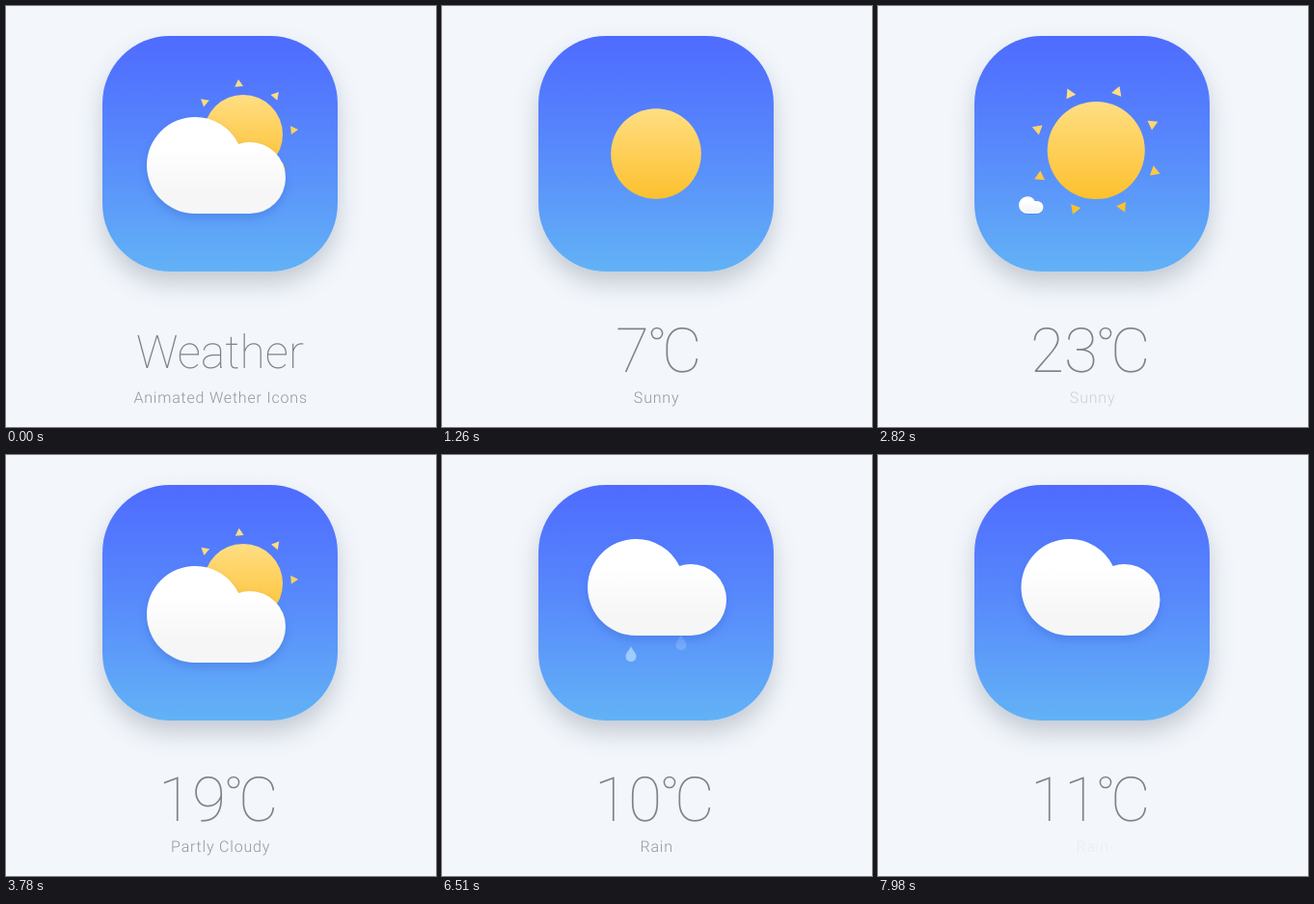
Recreate the animation shown at these times as an HTML page. Size 446x436 px, loop 8000 ms.

```html
<!DOCTYPE html>
<html lang="en">
<head>
<meta charset="utf-8">
<title>Weather icons</title>
<style>
  html, body { margin: 0; width: 100%; height: 100%; overflow: hidden; background: #f3f7fc; }
  .icon {
    position: absolute; left: 99.5px; top: 30.5px; width: 244px; height: 244px;
    border-radius: 70px;
    background: linear-gradient(#4e6bff, #5787fc 45%, #62b2f6);
    box-shadow: 0 13px 24px rgba(60, 70, 90, .25);
  }
  svg { position: absolute; left: 0; top: 0; display: block; }
  text { font-family: Roboto, "Open Sans", sans-serif; text-rendering: geometricPrecision; }
  .title { font-size: 48px; font-weight: 100; fill: #7f8288; }
  .temp { font-size: 64px; font-weight: 100; fill: #7f8288; }
  .label { font-size: 16px; font-weight: 300; letter-spacing: .8px; fill: #93969b; }
  #cloud { filter: drop-shadow(0 5px 4px rgba(30, 70, 190, .22)); }
</style>
</head>
<body>
<div class="icon"></div>
<svg width="446" height="436" viewBox="0 0 446 436">
  <defs>
    <linearGradient id="gold" gradientUnits="userSpaceOnUse" x1="0" y1="-53" x2="0" y2="53">
      <stop offset="0" stop-color="#ffde83"/>
      <stop offset="1" stop-color="#fdc02d"/>
    </linearGradient>
    <linearGradient id="white" gradientUnits="userSpaceOnUse" x1="0" y1="0" x2="0" y2="100">
      <stop offset=".3" stop-color="#fff"/>
      <stop offset=".8" stop-color="#f6f6f6"/>
    </linearGradient>
  </defs>

  <g id="sun" fill="url(#gold)">
    <path id="rays"/>
    <circle r="52.6"/>
  </g>
  <g id="drops" fill="#b4dcff">
    <path d="M0-8C1.5-4 5.5-1 5.5 2.5A5.5 5.5 0 0 1-5.5 2.5C-5.5-1-1.5-4 0-8Z"/>
    <path d="M0-8C1.5-4 5.5-1 5.5 2.5A5.5 5.5 0 0 1-5.5 2.5C-5.5-1-1.5-4 0-8Z"/>
  </g>
  <g id="cloud">
    <path fill="url(#white)" d="M50 0A50 50 0 0 1 95.2 28A37 37 0 0 1 107 26A37 37 0 0 1 107 100H50A50 50 0 0 1 50 0Z"/>
  </g>

  <text id="title" class="title" x="222" y="375" text-anchor="middle">Weather</text>
  <g id="temp" class="temp">
    <text id="digits" x="228" y="379" text-anchor="end">7</text>
    <circle cx="236" cy="339" r="5.6" fill="none" stroke="#7f8288" stroke-width="1.5"/>
    <text x="241" y="379">C</text>
  </g>
  <text id="label" class="label" x="222.6" y="411" text-anchor="middle"></text>
</svg>
<script>
const LOOP = 8000;
const $ = id => document.getElementById(id);
const sine = p => .5 - .5 * Math.cos(Math.PI * p);
const out = p => 1 - (1 - p) ** 3;
const linear = p => p;
const mix = (a, b, p) => a + (b - a) * p;

// Each step: start, end, value reached, easing.
function track(t, value, steps) {
  for (const [start, end, to, ease = sine] of steps) {
    if (t < start) break;
    value = t >= end ? to : mix(value, to, ease((t - start) / (end - start)));
  }
  return value;
}

const SUN_SIZE = [[500, 900, 0], [1000, 1500, 1, out], [3950, 4450, 0]];
const PARTLY = [[900, 900, 0], [2600, 3400, 1]];
const CLOUD_SIZE = [[500, 900, 0], [2600, 3400, 1]];
const RAY_REACH = [[950, 950, 34], [1270, 1700, 67, out]];
const CLOUDY = [[3950, 4500, 1]];
const LIFT = [[3950, 4500, 12], [5400, 6050, 28]];
const DEGREES = [[1270, 2400, 23], [2850, 3500, 19], [3900, 4450, 14], [5400, 6000, 10], [7850, 7950, 11]];

// Text, fade-in start, fade-out start; each fade lasts 200 ms.
const LABELS = [
  ["Animated Wether Icons", -300, 480],
  ["Sunny", 900, 2700],
  ["Partly Cloudy", 2900, 4000],
  ["Cloudy", 4200, 5400],
  ["Rain", 5600, 7800]
];
const fade = (t, a, b) => track(t, 0, [[a, a + 200, 1, linear], [b, b + 200, 0, linear]]);

// x position and start delay of each drop
const DROPS = [[196, 6060], [248, 6330]];
const FALL = 900;

function rayPath(reach, turn) {
  let d = "";
  for (let i = 0; i < 8; i++) {
    const a = (turn + i * 45) * Math.PI / 180;
    const x = reach * Math.cos(a), y = reach * Math.sin(a);
    const corners = [0, 1, 2].map(k => {
      const b = a + k * Math.PI * 2 / 3;
      return (x + 6.5 * Math.cos(b)).toFixed(2) + " " + (y + 6.5 * Math.sin(b)).toFixed(2);
    });
    d += "M" + corners.join("L") + "Z";
  }
  return d;
}

function drawSun(t) {
  const k = track(t, 1, PARTLY), gone = track(t, 0, CLOUDY);
  const size = track(t, 1, SUN_SIZE) * mix(1, .78, k);
  const x = mix(222, 246, k) - 30 * gone, y = mix(153, 133, k) + 22 * gone;
  $("sun").setAttribute("transform", `translate(${x} ${y}) scale(${size})`);
  $("sun").style.display = size < .005 ? "none" : "";
  const turn = t < 950 ? 40 : 20 + (t - 2820) * .0215;
  $("rays").setAttribute("d", rayPath(track(t, 67, RAY_REACH), turn));
}

function drawCloud(t) {
  const size = track(t, 1, CLOUD_SIZE);
  const cloudy = track(t, 0, CLOUDY);
  const sway = 1.5 * Math.sin((t - 5040) / 3920 * 2 * Math.PI);
  const x = 146 + cloudy * (4 + sway);
  const y = 215 - track(t, 0, LIFT);
  $("cloud").setAttribute("transform", `translate(${x} ${y}) scale(${size}) translate(0 -100)`);
  $("cloud").style.display = size < .005 ? "none" : "";
}

function drawDrops(t) {
  DROPS.forEach(([x, start], i) => {
    const drop = $("drops").children[i];
    const age = t - start;
    const p = age < 0 ? 0 : age % FALL / FALL;
    const shown = age >= 0 && t - p * FALL < 7000;
    const alpha = Math.min(1, p / .5, (1 - p) / .3) * .75;
    drop.setAttribute("transform", `translate(${x} ${mix(186, 226, p)})`);
    drop.setAttribute("opacity", shown ? alpha : 0);
  });
}

function drawText(t) {
  $("title").setAttribute("opacity", fade(t, -300, 480));
  const deg = Math.round(track(t, 7, DEGREES));
  $("digits").textContent = deg;
  $("temp").setAttribute("transform", `translate(${deg < 10 ? -13 : 0} 0)`);
  $("temp").setAttribute("opacity", track(t, 0, [[800, 1050, 1, linear]]));
  const [name, a, b] = LABELS.filter(l => t >= l[1]).pop();
  $("label").textContent = name;
  $("label").setAttribute("opacity", fade(t, a, b));
}

function draw(t) {
  drawSun(t);
  drawCloud(t);
  drawDrops(t);
  drawText(t);
}

const begin = performance.now();
function tick() {
  draw((performance.now() - begin) % LOOP);
  requestAnimationFrame(tick);
}
draw(0);
requestAnimationFrame(tick);
</script>
</body>
</html>
```
